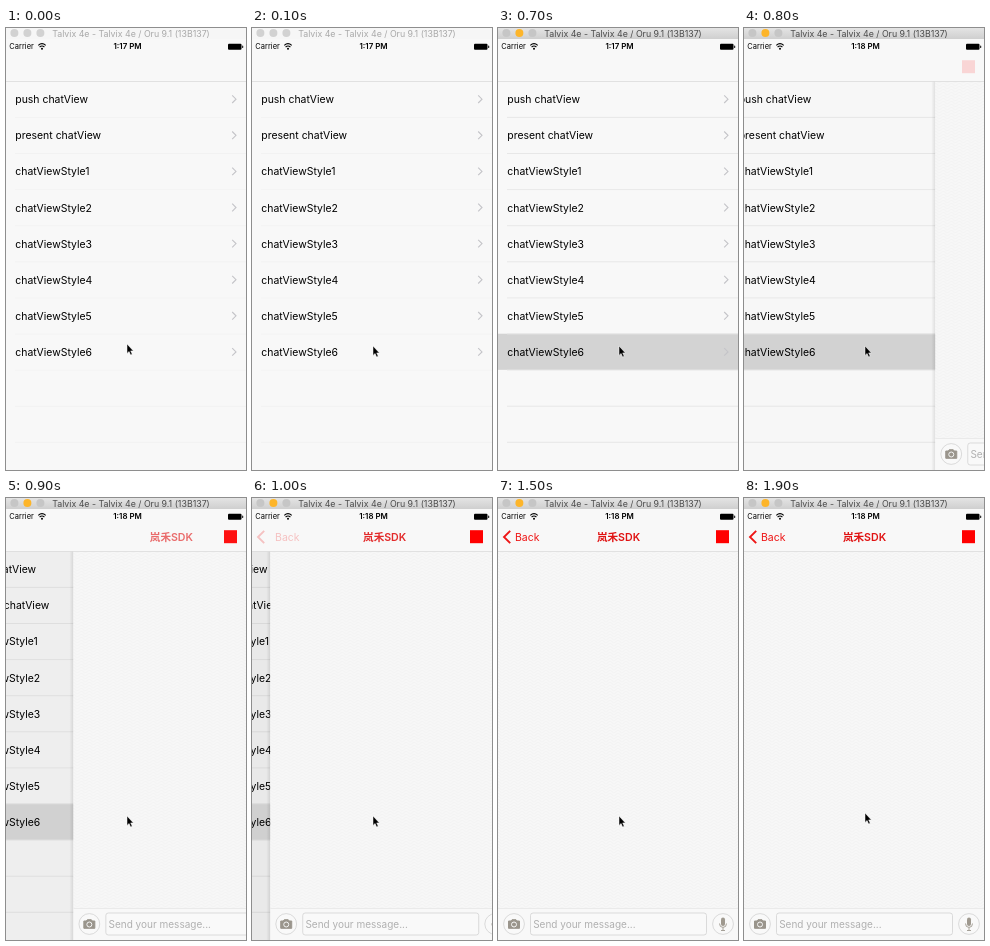
An HTML page for the animation above (2000 ms loop, 240x442 px).

```html
<!DOCTYPE html>
<html lang="en">
<head>
<meta charset="utf-8">
<title>Chat view push</title>
<style>
html, body { margin: 0; width: 100%; height: 100%; overflow: hidden; background: #f8f8f8; }
svg { display: block; width: 100vw; height: 100vh; }
text { font-family: Inter, "Noto Sans CJK SC", "Noto Sans CJK", sans-serif; white-space: pre; }
</style>
</head>
<body>
<svg viewBox="0 0 240 442" preserveAspectRatio="none">
  <defs>
    <linearGradient id="bar" x2="0" y2="1">
      <stop stop-color="#e4e4e4"/><stop offset="1" stop-color="#cfcfcf"/>
    </linearGradient>
    <linearGradient id="edge">
      <stop stop-color="#000" stop-opacity="0"/><stop offset="1" stop-color="#000" stop-opacity=".1"/>
    </linearGradient>
    <pattern id="weave" width="8" height="6" patternUnits="userSpaceOnUse">
      <rect width="8" height="6" fill="#f7f7f7"/>
      <path d="M0 1L4 4L8 1M0 4L4 7L8 4M0 -2L4 1L8 -2" fill="none" stroke="#f1f1f1" stroke-width=".8"/>
    </pattern>
  </defs>
  <rect width="240" height="442" fill="#f8f8f8"/>

  <g id="list"></g>
  <rect id="dim" y="53" width="240" height="389"/>

  <g id="page">
    <rect x="-4" y="53" width="4" height="389" fill="url(#edge)"/>
    <rect y="53" width="241" height="358" fill="url(#weave)"/>
    <rect y="410" width="241" height="32" fill="#f8f8f8"/>
    <path d="M0 410.5H241" stroke="#e4e4e4" stroke-width=".7"/>
    <g fill="#f9f9f9" stroke="#d2d2d2" stroke-width=".8">
      <circle cx="16" cy="426" r="10.4"/>
      <circle cx="225" cy="426" r="10.4"/>
      <rect x="32.5" y="415" width="176" height="22" rx="2.5"/>
    </g>
    <path d="M10.5 423H13L14 421.7H18L19 423H21.5V430.3H10.5Z" fill="#9a958c" stroke="#9a958c" stroke-linejoin="round"/>
    <circle cx="16" cy="426.5" r="2.5" fill="#9a958c" stroke="#f6f6f6"/>
    <rect x="223" y="419.5" width="4" height="8.5" rx="2" fill="#9f998f"/>
    <path d="M221.5 425.5a3.5 3.9 0 0 0 7 0M225 429.5V432.5M223 432.5H227" fill="none" stroke="#9f998f" stroke-width=".9"/>
    <text x="35.2" y="429.8" font-size="10" fill="#b0b0b0">Send your message...</text>
  </g>

  <rect y="11" width="240" height="42" fill="#f8f8f8"/>
  <path d="M0 53.5H240" stroke="#dcdcdc" stroke-width=".8"/>
  <g font-size="7.5">
    <text x="3.3" y="21.2">Carrier</text>
    <text id="clock" x="121.5" y="21.2" font-size="7.9" text-anchor="middle" font-weight="600"></text>
  </g>
  <path d="M32.3 17.3Q36 14 39.7 17.3M33.6 19Q36 17 38.4 19" fill="none" stroke="#000" stroke-width="1.1"/>
  <circle cx="36" cy="20.7" r="1"/>
  <rect x="222" y="15.7" width="13.5" height="6" rx="1"/>
  <rect x="236.2" y="17.4" width="1" height="2.6" rx=".5"/>

  <path id="arrow" d="M12.2 32.8L6 39L12.2 45.2" fill="none" stroke="#ee1515" stroke-width="1.9"/>
  <text id="back" y="43" font-size="10.5" fill="#ee1515">Back</text>
  <text id="title" y="43" font-size="10.6" font-weight="600" fill="#e01212" text-anchor="middle">岚禾SDK</text>
  <rect id="square" x="218" y="32.2" width="13" height="13" fill="#f00"/>

  <rect id="chrome" width="240" height="11"/>
  <g id="lights"><circle cx="8.4" cy="5" r="4"/><circle cx="21.4" cy="5" r="4"/><circle cx="34.4" cy="5" r="4"/></g>
  <text id="caption" x="125" y="8.5" font-size="8.8" text-anchor="middle">Talvix 4e - Talvix 4e / Oru 9.1 (13B137)</text>

  <path id="cursor" d="M0 0V9.4L2.1 7.5L3.6 11L5.2 10.3L3.7 6.9H6.4Z" stroke="#fff" stroke-width=".5"/>
</svg>
<script>
const $ = id => document.getElementById(id);
const set = (el, attrs) => { for (const k in attrs) el.setAttribute(k, attrs[k]); };
const shift = (el, x, y = 0) => set(el, { transform: `translate(${x} ${y})` });

const LOOP = 2000, STEP = 100, ROW = 36.1, TOP = 53;
const rows = ['push chatView', 'present chatView'];
for (let i = 1; i <= 6; i++) rows.push('chatViewStyle' + i);

let html = `<rect id="pick" y="${TOP + 7 * ROW}" width="240" height="${ROW}" fill="#d3d3d3"/>`;
for (let i = 1; i <= 10; i++) {
  html += `<path class="rule" d="M9 ${TOP + i * ROW + .3}H240" stroke-width=".8"/>`;
}
rows.forEach((name, i) => {
  const y = TOP + 18.2 + i * ROW;
  html += `<text x="9.3" y="${y + 4}" font-size="10.45">${name}</text>
    <path d="M226.2 ${y - 3.8}L230 ${y}L226.2 ${y + 3.8}" fill="none" stroke="#c4c4c8" stroke-width="1.1"/>`;
});
$('list').innerHTML = html;
const rules = document.querySelectorAll('.rule');
const lights = $('lights').children;

// critically damped spring: 1 at the start, 0 at rest
function spring(ms) {
  const u = Math.max(0, ms) * .017;
  return (1 + u) * Math.exp(-u);
}

function cursorY(t) {
  if (t < 100) return 316;
  if (t < 1800) return 318;
  return t < 1900 ? 317 : 315;
}

function draw(t) {
  const active = t >= 600, picked = t >= 700;
  const left = spring(t - 751), done = 1 - left;

  set($('chrome'), { fill: active ? 'url(#bar)' : '#f6f6f6' });
  set($('caption'), { fill: active ? '#4a4a4a' : '#a8a8a8' });
  for (let i = 0; i < 3; i++) {
    set(lights[i], { fill: !active ? '#d2d2d2' : i === 1 ? '#fdb52a' : '#c6c6c6' });
  }
  $('clock').textContent = t < 800 ? '1:17 PM' : '1:18 PM';

  set($('pick'), { opacity: picked ? 1 - .35 * done * done : 0 });
  rules.forEach(r => set(r, { stroke: picked ? '#e4e4e4' : '#f2f2f2' }));
  shift($('list'), -72 * done);
  set($('dim'), { opacity: .075 * done * done });
  shift($('page'), 240 * left);
  set($('page'), { opacity: done > 0 ? 1 : 0 });

  const late = Math.min(1, Math.max(0, (done - .9) * 10));
  set($('arrow'), { opacity: late });
  set($('back'), { x: 17 + 80 * left, opacity: late });
  set($('title'), { x: 120.5 + 160 * left, opacity: Math.max(0, done * 1.4 - .4) });
  set($('square'), { opacity: Math.min(1, done * done * 1.17 + done * .45) });
  shift($('cursor'), 121, cursorY(t));
}

const start = performance.now();
function tick() {
  const t = (performance.now() - start) % LOOP;
  draw(Math.floor(t / STEP) * STEP);
  requestAnimationFrame(tick);
}
tick();
</script>
</body>
</html>
```
